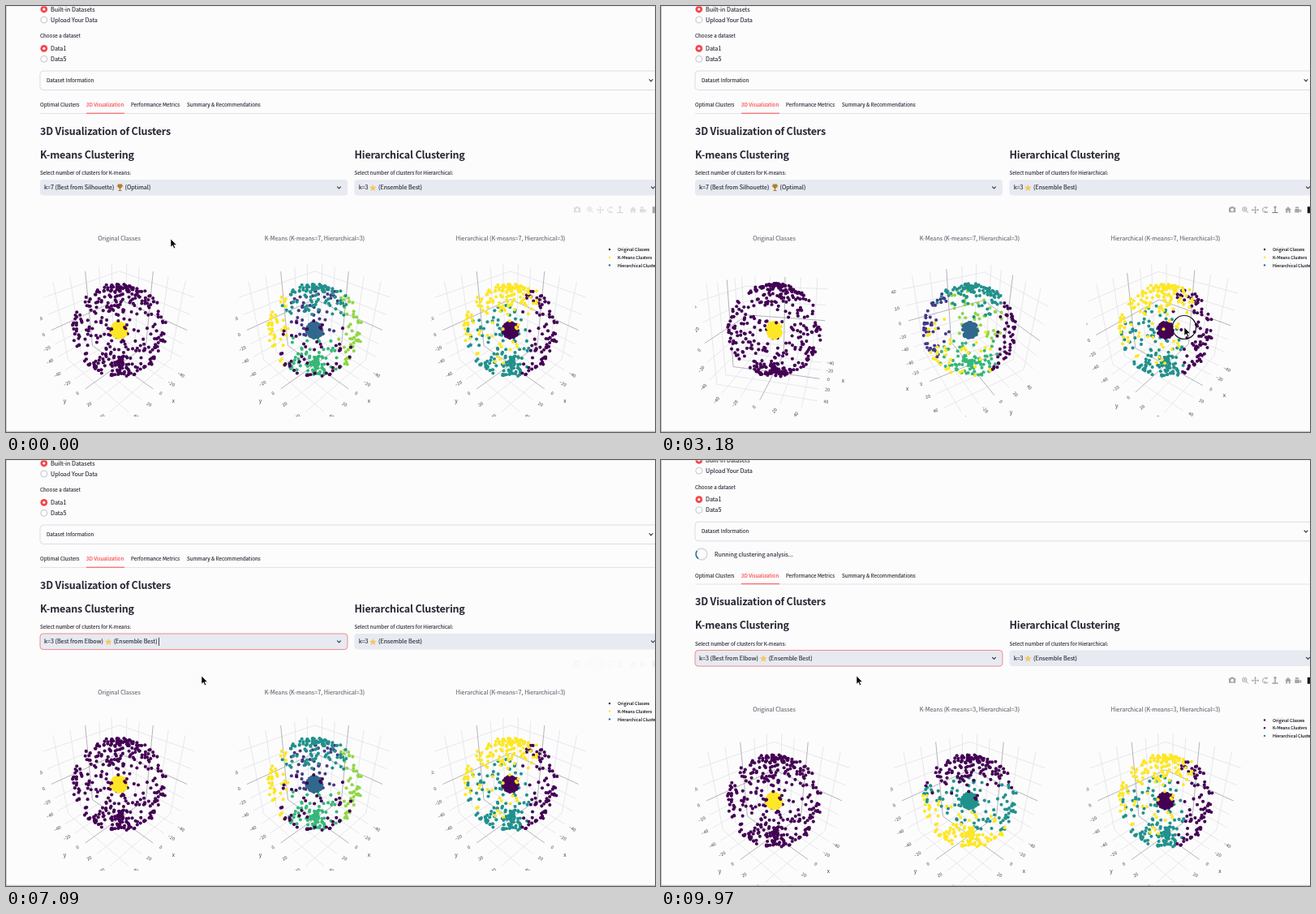
An HTML page with a canvas for the animation above (10000 ms loop, 800 by 525 pixels).

```html
<!DOCTYPE html>
<html lang="en">
<head>
<meta charset="utf-8">
<title>3D Visualization of Clusters</title>
<style>
  html, body { margin: 0; width: 100%; height: 100%; overflow: hidden; background: #fcfcfd; }
  canvas, svg { position: absolute; left: 0; top: 0; width: 800px; height: 525px; }
  text {
    font-family: "Noto Sans CJK SC", "Noto Sans CJK JP", "Noto Sans CJK KR", "Noto Sans", sans-serif;
    font-size: 6.27px; fill: #262833; stroke: #262833; stroke-width: .12; white-space: pre;
  }
  .b { font-size: 7.16px; }
  .h { font-size: 12.53px; font-weight: 600; letter-spacing: -.015em; stroke: none; }
  .t { font-size: 7.16px; fill: #666872; stroke: #666872; text-anchor: middle; }
  .l { font-size: 5.35px; fill: #0d0e14; stroke: #0d0e14; }
  .red { fill: #f93f42; stroke: #f93f42; }
  .box { fill: #e7eaf1; }
  .chev { fill: none; stroke: #31333f; stroke-width: 1.1; stroke-linecap: round; stroke-linejoin: round; }
  .icons { fill: none; stroke: #a3a5ab; stroke-width: 1; }
  .icons .f { fill: #a3a5ab; stroke: none; }
</style>
</head>
<body>
<canvas id="plots"></canvas>
<svg viewBox="0 0 800 525">
  <defs>
    <path id="star" fill="#f6cb52" stroke="#e5b23c" stroke-width=".3"
      d="M0-3.6 1-1.1 3.7-.8 1.7.9 2.4 3.4 0 2.1-2.4 3.4-1.7.9-3.7-.8-1-1.1z"/>
    <path id="chevron" class="chev" d="M-2-1 0 1.1 2-1"/>
    <g id="on"><circle r="4.4" fill="#f4484b"/><circle r="1.6" fill="#fff"/></g>
    <circle id="off" r="4" fill="#fff" stroke="#b3b5bd" stroke-width=".8"/>
  </defs>

  <g id="top">
    <use href="#on" x="46.8" y="4"/><text class="b" x="55" y="6.7">Built-in Datasets</text>
    <use href="#off" x="46.8" y="17"/><text class="b" x="55" y="19.6">Upload Your Data</text>
    <text x="42" y="39.3">Choose a dataset</text>
    <use href="#on" x="46.8" y="52.3"/><text class="b" x="55" y="54.9">Data1</text>
    <use href="#off" x="46.8" y="65.3"/><text class="b" x="55" y="67.9">Data5</text>
    <rect x="42" y="80" width="770" height="23.5" rx="4" fill="none" stroke="#d9dade" stroke-width=".9"/>
    <text x="50" y="93.9">Dataset Information</text>
    <use href="#chevron" x="795" y="91.7"/>
  </g>

  <g id="spin">
    <circle cx="50" cy="116" r="6.9" fill="none" stroke="#d8dade" stroke-width="1.6"/>
    <path id="arc" d="M45.1 111.1A6.9 6.9 0 0 0 45.1 120.9" fill="none" stroke="#2f7196" stroke-width="1.6"/>
    <text class="b" x="66" y="118.7">Running clustering analysis...</text>
  </g>

  <g id="low">
    <text x="42" y="124.4">Optimal Clusters</text>
    <text class="red" x="99" y="124.4">3D Visualization</text>
    <text x="154" y="124.4">Performance Metrics</text>
    <text x="223" y="124.4">Summary &amp; Recommendations</text>
    <path d="M42 132.5H800" stroke="#e2e3e8"/>
    <path d="M99 132.2H146" stroke="#ff4b4b"/>
    <text class="h" x="42" y="158.7">3D Visualization of Clusters</text>
    <text class="h" x="42" y="187.8">K-means Clustering</text>
    <text class="h" x="429.5" y="187.8">Hierarchical Clustering</text>
    <text x="42" y="208">Select number of clusters for K-means:</text>
    <text x="429.5" y="208">Select number of clusters for Hierarchical:</text>

    <rect id="pick" class="box" x="42" y="214" width="379" height="19.6" rx="4"/>
    <use href="#chevron" x="410.5" y="223.8"/>
    <g id="seven">
      <text class="b" x="47" y="226.3">k=7 (Best from Silhouette)</text>
      <path d="M138 219.5h5v3q-.6 2.4-2 2.6v1.6h1.4v1.2h-3.8v-1.2h1.4v-1.6q-1.4-.2-2-2.6z" fill="#b27f2b"/>
      <path d="M137.8 220.4q-2 2.2 1 3M143.2 220.4q2 2.2-1 3" fill="none" stroke="#b27f2b" stroke-width=".7"/>
      <text class="b" x="146.5" y="226.3">(Optimal)</text>
    </g>
    <g id="three">
      <text class="b" x="47" y="226.3">k=3 (Best from Elbow)</text>
      <use href="#star" x="126.3" y="224"/>
      <text class="b" x="132.7" y="226.3">(Ensemble Best)</text>
    </g>
    <path id="caret" d="M188.5 218.8V229" stroke="#222" stroke-width=".8"/>

    <rect class="box" x="429.5" y="214" width="385" height="19.6" rx="4"/>
    <use href="#chevron" x="797.5" y="223.8"/>
    <text class="b" x="434.7" y="226.3">k=3</text>
    <use href="#star" x="452.3" y="224"/>
    <text class="b" x="459" y="226.3">(Ensemble Best)</text>

    <g id="bar" class="icons">
      <path class="f" fill-rule="evenodd" d="M700 248.3h2l.8-1.2h2.6l.8 1.2h2v6h-8.2zM704.1 249.3a1.9 1.9 0 1 0 .1 0z"/>
      <circle cx="719.3" cy="250.4" r="2.7"/><path d="M721.3 252.4l2.6 2.6M718 250.4h2.6M719.3 249.1v2.6"/>
      <path d="M732.5 247.3v8M728.5 251.3h8M731.3 248.3l1.2-1.2 1.2 1.2M731.3 254.3l1.2 1.2 1.2-1.2M729.5 250.1l-1.2 1.2 1.2 1.2M735.5 250.1l1.2 1.2-1.2 1.2"/>
      <path d="M747.8 252.8a3.3 3.3 0 1 1-1.2-4.2M743 252.5l5 2.2M747 246.8v2.2h-2"/>
      <path d="M757 247v7M753.4 254.6h7.2M755.6 248.4l1.4-1.6 1.4 1.6" stroke="#6f7178"/>
      <path class="f" d="M769 251.3l4-4 4 4h-1.2v3.6h-2v-2.4h-1.6v2.4h-2v-3.6z"/>
      <path class="f" d="M781.3 250h5.6v4.6h-5.6zM787.3 251.6l2-1.2v4l-2-1.2zM782 247.4h4v1.8h-4z"/>
      <rect x="796.8" y="247.3" width="8" height="8" fill="#17181c" stroke="none"/>
    </g>

    <text class="t" x="139.5" y="289.2">Original Classes</text>
    <text class="t" id="title2" x="380.5" y="289.2"></text>
    <text class="t" id="title3" x="622" y="289.2"></text>

    <circle cx="744" cy="300" r="1.2" fill="#440154"/><text class="l" x="754" y="302.1">Original Classes</text>
    <circle id="key2" cx="744" cy="309.7" r="1.2"/><text class="l" x="754" y="311.8">K-Means Clusters</text>
    <circle id="key3" cx="744" cy="319.4" r="1.2"/><text class="l" x="754" y="321.5">Hierarchical Clusters</text>

    <g id="menu">
      <rect x="41" y="237" width="381" height="151" rx="4" fill="#dfe0e5" opacity=".6"/>
      <rect x="42" y="236" width="379" height="150" rx="4" fill="#fff" stroke="#e4e5ea" stroke-width=".6"/>
    </g>
  </g>

  <path d="M.5 0V525" stroke="#cbccd0"/>
  <path d="M0 .3H800" stroke="#dcdde0" stroke-width=".6"/>
  <path d="M0 524.3H800" stroke="#b9babe"/>

  <g id="mouse">
    <circle id="ring" r="14.5" fill="none" stroke="#15151a" stroke-width="1.2"/>
    <path id="arrow" d="M0 0V10.2L2.4 8 4 11.7 5.7 11 4.1 7.4H7.3z" fill="#000" stroke="#fff" stroke-width=".6"/>
    <path id="beam" d="M-2.3-4.6Q0-4.6 0-3.2Q0-4.6 2.3-4.6M0-3.4V3.4M-2.3 4.6Q0 4.6 0 3.2Q0 4.6 2.3 4.6M-1 1.4H1"
      fill="none" stroke="#111" stroke-width=".9"/>
  </g>
</svg>
<script>
const LOOP = 10000, OPEN = 5850, PICKED = 6950, RERUN = 7400, UPDATED = 8900, RESET = 4650;
const HOME = [45, 35.26];
const FAMILY = 'px "Noto Sans CJK SC", "Noto Sans CJK JP", "Noto Sans CJK KR", "Noto Sans", sans-serif';
const [PURPLE, INDIGO, BLUE, TEAL, GREEN, LIME, YELLOW] =
  ['#440154', '#443983', '#31688e', '#21918c', '#35b779', '#90d743', '#fde725'];

// Tracks: [time, a, b], eased between keys
const pointer = [[0, 203, 287], [450, 203, 287], [950, 192, 373], [1050, 192, 373], [1150, 184, 376],
  [1300, 184, 376], [1750, 225, 358], [1820, 225, 358], [2100, 340, 388], [2150, 340, 388],
  [2650, 423, 388], [2720, 423, 388], [3050, 638, 396], [3180, 645, 396], [3700, 680, 388],
  [3800, 680, 388], [4400, 773, 252], [4750, 773, 252], [5450, 321, 234], [5700, 305, 226],
  [6050, 305, 226], [6700, 241, 266]];
const cameras = [
  [[1050, ...HOME], [1150, 52, 35], [1300, 52, 35], [1750, 15, 19]],
  [[2150, ...HOME], [2650, -30, 35]],
  [[3050, ...HOME], [3180, 38, 35], [3700, 8, 32]]
];
const presses = [[1050, 1760], [2150, 2660], [3050, 3710], [4600, 4750], [5750, 5850], [6850, 6950]];
const barFade = [[0, .35, 0], [150, 1, 0], [5350, 1, 0], [5550, 0, 0], [7060, 0, 0], [7300, 1, 0]];

const $ = id => document.getElementById(id);
const show = (id, on) => { $(id).style.display = on ? '' : 'none'; };
const dot = (a, b) => a[0] * b[0] + a[1] * b[1] + a[2] * b[2];

function at(track, t) {
  const i = track.findIndex(k => k[0] > t);
  if (i < 0) return track[track.length - 1].slice(1);
  if (!i) return track[0].slice(1);
  const [t0, a0, b0] = track[i - 1], [t1, a1, b1] = track[i];
  const u = (t - t0) / (t1 - t0), e = u * u * (3 - 2 * u);
  return [a0 + (a1 - a0) * e, b0 + (b1 - b0) * e];
}

function basis([az, el]) {
  const a = az * Math.PI / 180, b = el * Math.PI / 180;
  const c = Math.cos(a), s = Math.sin(a), ce = Math.cos(b), se = Math.sin(b);
  return { right: [-s, c, 0], up: [-c * se, -s * se, ce], eye: [c * ce, s * ce, se] };
}

let seed = 11;
function rnd() {
  seed = (seed + 0x6d2b79f5) | 0;
  let x = Math.imul(seed ^ seed >>> 15, 1 | seed);
  x ^= x + Math.imul(x ^ x >>> 7, 61 | x);
  return ((x ^ x >>> 14) >>> 0) / 4294967296;
}

function ballPoint(r) {
  const polar = Math.PI * rnd(), turn = 2 * Math.PI * rnd();
  return [r * Math.sin(polar) * Math.cos(turn), r * Math.sin(polar) * Math.sin(turn), r * Math.cos(polar)];
}

// Colour of the centroid closest to p
const closeness = (c, p) => dot(c, p) - dot(c, c) / 2;
const nearest = (centroids, p) =>
  centroids.reduce((a, b) => closeness(b[0], p) > closeness(a[0], p) ? b : a)[1];
const seven = [[[0, 0, 1], TEAL], [[0, 0, -1], GREEN], [[.71, -.71, 0], YELLOW],
  [[-.71, .71, 0], LIME], [[.71, .71, 0], PURPLE], [[-.71, -.71, 0], INDIGO]];
// Right, up and toward the viewer, as seen from the home camera
const sides = [[[-.47, .75, .47], YELLOW], [[-.44, -.6, -.66], TEAL], [[.99, -.1, 0], PURPLE]];
const layers = [[[0, .3, .1], PURPLE], [[0, 0, 0], TEAL], [[-.12, -.28, .1], YELLOW]];

const view = basis(HOME), points = [];
for (let i = 0; i < 390; i++) {
  const p = ballPoint(.455 + .025 * rnd());
  const q = [dot(p, view.right), dot(p, view.up), dot(p, view.eye)];
  points.push({ p, colors: [PURPLE, nearest(seven, p), nearest(sides, q), nearest(layers, q)] });
}
for (let i = 0; i < 220; i++)
  points.push({ p: ballPoint(.085 * Math.cbrt(rnd())), colors: [YELLOW, BLUE, PURPLE, TEAL] });

const canvas = $('plots'), ctx = canvas.getContext('2d'), dpr = window.devicePixelRatio || 1;
canvas.width = 800 * dpr;
canvas.height = 525 * dpr;

function drawScene(cx, camera, colorIndex, alpha) {
  const { right, up, eye } = basis(camera), cy = 399.5;
  const project = p => {
    const depth = 2.165 - dot(p, eye), k = 256 / depth;
    return [cx + k * dot(p, right), cy - k * dot(p, up), depth];
  };
  const side = eye.map(v => v < 0 ? -.5 : .5);
  const ticks = [-40, -20, 0, 20, 40];

  ctx.save();
  ctx.beginPath();
  ctx.rect(cx - 97.5, 294, 195, 212);
  ctx.clip();

  const grid = zero => {
    ctx.beginPath();
    for (const v of ticks) if ((v === 0) === zero)
      for (let a = 0; a < 3; a++) for (let b = 0; b < 3; b++) if (a !== b) {
        const p = [0, 0, 0], c = 3 - a - b;
        p[a] = v / 106;
        p[b] = -side[b];
        p[c] = -.5;
        ctx.moveTo(...project(p).slice(0, 2));
        p[c] = .5;
        ctx.lineTo(...project(p).slice(0, 2));
      }
    ctx.strokeStyle = zero ? '#a2a3a8' : '#e3e3e7';
    ctx.lineWidth = .8;
    ctx.stroke();
  };
  grid(false);
  grid(true);

  // Axis edge, with labels pushed outward along another axis
  const label = (axis, edge, out) => {
    const d = [0, 0, 0];
    d[out] = Math.sign(side[out]);
    let dx = dot(d, right), dy = -dot(d, up);
    const len = Math.hypot(dx, dy) || 1;
    dx /= len;
    dy /= len;
    let angle = Math.atan2(dy, dx);
    if (angle > Math.PI / 2) angle -= Math.PI;
    if (angle < -Math.PI / 2) angle += Math.PI;
    const write = (text, v, gap, size, turn) => {
      const p = edge.slice();
      p[axis] = v / 106;
      const [x, y] = project(p);
      ctx.save();
      ctx.translate(x + dx * gap, y + dy * gap);
      ctx.rotate(turn);
      ctx.font = size + FAMILY;
      ctx.fillText(text, 0, size * .36);
      ctx.restore();
    };
    for (const v of ticks) write(String(v).replace('-', '\u2212'), v, 11, 5.4, angle);
    write('xyz'[axis], 0, 29, 6.6, 0);
  };
  ctx.fillStyle = '#44454b';
  ctx.textAlign = 'center';
  const [sx, sy, sz] = side;
  label(0, [0, sy, -sz], 1);
  label(1, [sx, 0, -sz], 0);
  const e1 = [sx, -sy, 0], e2 = [-sx, sy, 0];
  if (project(e1)[0] < project(e2)[0]) label(2, e1, 0);
  else label(2, e2, 1);

  ctx.globalAlpha = alpha;
  points.map(o => [...project(o.p), o.colors[colorIndex]])
    .sort((a, b) => b[2] - a[2])
    .forEach(([x, y, , color]) => {
      ctx.fillStyle = color;
      ctx.beginPath();
      ctx.arc(x, y, 2.05, 0, 7);
      ctx.fill();
    });
  ctx.restore();
}

for (let k = 2; k < 9; k++) {
  const row = document.createElementNS('http://www.w3.org/2000/svg', 'text');
  row.setAttribute('class', 'b');
  row.setAttribute('x', 50);
  row.setAttribute('y', 209.2 + 20 * k);
  row.textContent = 'k=' + k + (k === 3 ? ' (Best from Elbow)' : k === 7 ? ' (Best from Silhouette)' : '');
  $('menu').append(row);
}

function render(t) {
  const rerun = t >= RERUN, updated = t >= UPDATED, picked = t >= PICKED;
  const drop = rerun ? 20.5 : 0;
  $('top').setAttribute('transform', `translate(0 ${rerun ? -3.7 : 0})`);
  $('low').setAttribute('transform', `translate(0 ${drop})`);
  show('spin', rerun);
  $('arc').setAttribute('transform', `rotate(${(t - 8000) * .36} 50 116)`);
  show('seven', !picked);
  show('three', picked);
  show('caret', picked && !rerun);
  show('menu', t >= OPEN && !picked);
  $('pick').style.stroke = t >= OPEN ? '#f58a8c' : 'none';
  $('bar').style.opacity = at(barFade, t)[0];
  $('title2').textContent = `K-Means (K-means=${updated ? 3 : 7}, Hierarchical=3)`;
  $('title3').textContent = `Hierarchical (K-means=${updated ? 3 : 7}, Hierarchical=3)`;
  $('key2').style.fill = updated ? PURPLE : YELLOW;
  $('key3').style.fill = rerun ? TEAL : BLUE;

  $('mouse').setAttribute('transform', `translate(${at(pointer, t)})`);
  const beam = t >= 5420 && t < 6150;
  show('beam', beam);
  show('arrow', !beam);
  show('ring', presses.some(([a, b]) => t >= a && t < b));

  ctx.setTransform(dpr, 0, 0, dpr, 0, drop * dpr);
  ctx.clearRect(0, -drop, 800, 525);
  [139.5, 380.5, 622].forEach((cx, i) => {
    const camera = t < RESET ? at(cameras[i], t) : HOME;
    drawScene(cx, camera, i === 1 && updated ? 3 : i, rerun && !updated ? .85 : 1);
  });
}

const start = performance.now();
function frame() {
  render((performance.now() - start) % LOOP);
  requestAnimationFrame(frame);
}
frame();
</script>
</body>
</html>
```
